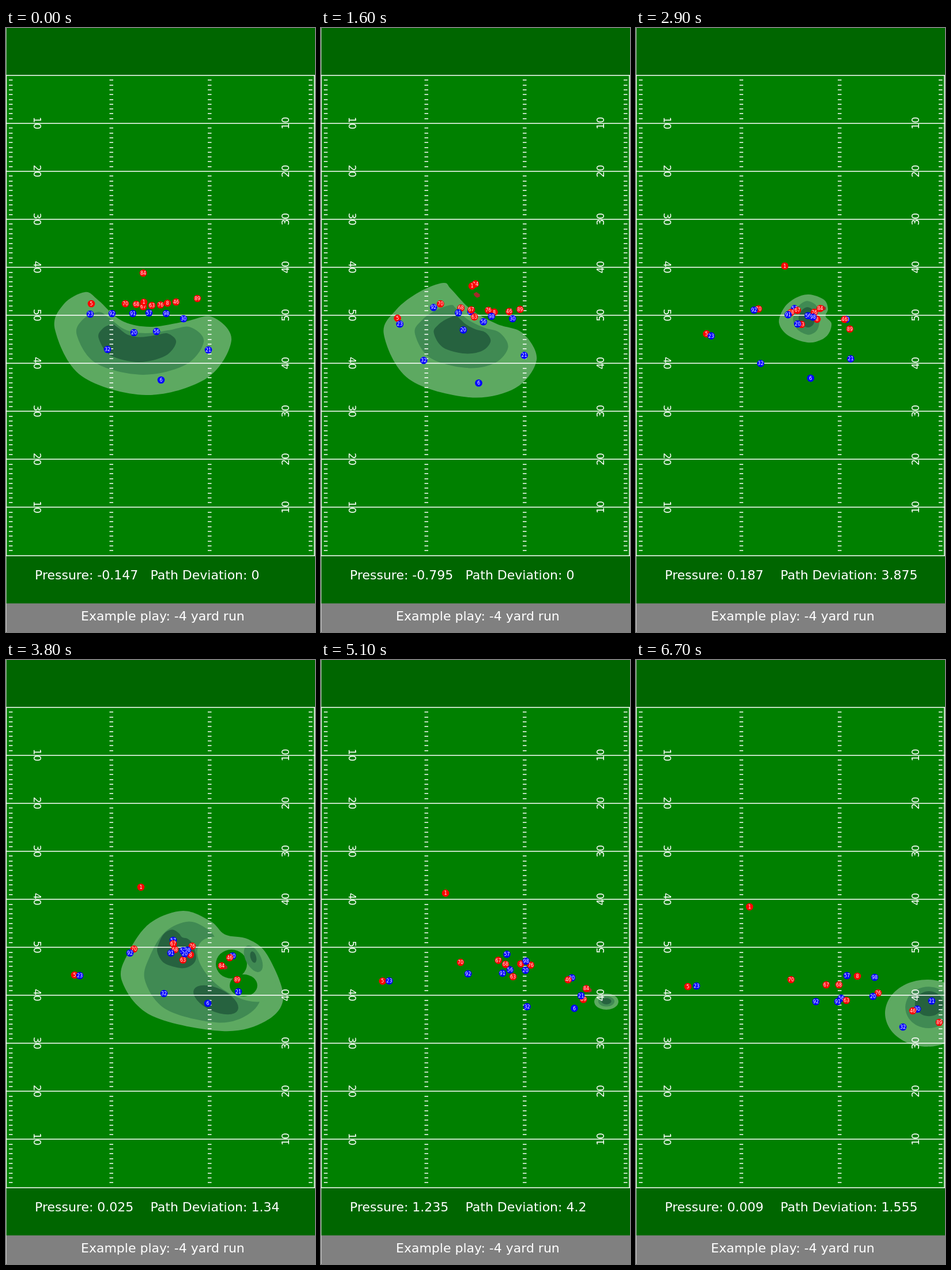
These frames come from a looping animation (536x1045 px, 6.8 s). An HTML page:

```html
<!DOCTYPE html>
<html lang="en">
<head>
<meta charset="utf-8">
<title>Example play</title>
<style>
  html, body { margin: 0; width: 100%; height: 100%; overflow: hidden; background: #006600; }
  svg { display: block; width: 536px; height: 1045px; font-family: "DejaVu Sans", sans-serif; fill: #fff; }
  .line { stroke: #fff; stroke-width: 1.5; fill: none; }
  .yard { font-size: 17px; text-anchor: middle; }
  .info { font-size: 22px; white-space: pre; }
  .player { font-size: 8px; text-anchor: middle; }
</style>
</head>
<body>
<svg viewBox="0 0 536 1045">
  <rect width="536" height="1045" fill="#006600"/>
  <rect y="82" width="536" height="831" fill="#008000"/>
  <g id="heat"></g>
  <g id="field"></g>
  <g id="team"></g>
  <rect y="995.5" width="536" height="50" fill="#808080"/>
  <rect width="1" height="1045" opacity=".6"/>
  <text class="info" id="pressure" x="50" y="954"></text>
  <text class="info" id="deviation" x="250.5" y="954"></text>
  <text class="info" x="130" y="1025">Example play: -4 yard run</text>
</svg>
<script>
const STEP = 100, FRAMES = 68, TOP = 82, YARD = 8.305;
const LIGHT = '#5da961', MID = '#408a53', DARK = '#26623f', GRASS = '#008000';
const $ = id => document.getElementById(id);

function add(parent, tag, attrs, text) {
  const el = document.createElementNS('http://www.w3.org/2000/svg', tag);
  for (const k in attrs) el.setAttribute(k, attrs[k]);
  if (text !== undefined) el.textContent = text;
  parent.appendChild(el);
  return el;
}

function drawField() {
  let d = 'M.5 82V913M535 82V913';
  for (let yard = 0; yard <= 100; yard++) {
    const y = Math.round(TOP + yard * YARD);
    if (yard % 10 === 0) d += `M0 ${y}H536`;
    else for (const x of [5, 179.5, 350, 525]) d += `M${x} ${y}h6.5`;
  }
  add($('field'), 'path', { d, class: 'line' });
  for (let yard = 10; yard < 100; yard += 10) {
    const y = TOP + yard * YARD - 0.5;
    for (const [x, turn] of [[54, 90], [485, -90]])
      add($('field'), 'text', { class: 'yard', y: 6.2, transform: `translate(${x} ${y}) rotate(${turn})` },
        Math.min(yard, 100 - yard));
  }
}

// Interpolation between keys at the given times
const mix = (a, b, u) => a + (b - a) * u;
function locate(times, f) {
  let i = 0;
  while (i < times.length - 2 && f >= times[i + 1]) i++;
  return [i, (f - times[i]) / (times[i + 1] - times[i])];
}
function linear(times, values, f) {
  const [i, u] = locate(times, f);
  return mix(values[i], values[i + 1], u);
}
function spline(times, v, f) {
  const [i, u] = locate(times, f), h = times[i + 1] - times[i], w = 1 - u;
  const slope = k => {
    const a = Math.max(k - 1, 0), b = Math.min(k + 1, v.length - 1);
    return k ? (v[b] - v[a]) / (times[b] - times[a]) : 0;
  };
  return v[i] * (1 + 2 * u) * w * w + v[i + 1] * u * u * (3 - 2 * u)
       + h * u * w * (slope(i) * w - slope(i + 1) * u);
}

// Closed smooth outline through a flat list of points
function outline(p) {
  const n = p.length / 2, at = (i, c) => p[((i + n) % n) * 2 + c];
  let d = `M${p[0]} ${p[1]}`;
  for (let i = 0; i < n; i++) {
    const c = [];
    for (const k of [0, 1]) {
      c[k] = at(i, k) + (at(i + 1, k) - at(i - 1, k)) / 6;
      c[k + 2] = at(i + 1, k) - (at(i + 2, k) - at(i, k)) / 6;
      c[k + 4] = at(i + 1, k);
    }
    d += 'C' + c.map(v => v.toFixed(1)).join(' ');
  }
  return d + 'Z';
}
function oval(cx, cy, rx, ry) {
  const p = [];
  for (let i = 0; i < 12; i++) {
    const a = Math.PI * (1 + i / 6);
    p.push(cx + rx * Math.cos(a), cy + ry * Math.sin(a));
  }
  return p;
}

// Heat map: the inner bands are the outer edge shrunk towards a focus
const heat = [];
const shrink = (edge, [fx, fy, sx, sy]) =>
  edge.map((v, i) => i % 2 ? mix(fy, v, sy) : mix(fx, v, sx));
function heatKey(time, edge, mid, core = [mid[0], mid[1], mid[2] * 0.61, mid[3] * 0.6]) {
  heat.push({ time, bands: [edge, shrink(edge, mid), shrink(edge, core)] });
}
heatKey(0, [85,522, 100,478, 137,457, 160,471, 200,506, 250,517, 310,508, 358,500, 391,540, 348,606, 243,635, 131,602],
  [220, 545, 0.72, 0.61]);
heatKey(16, [109,530, 130,488, 170,457, 212,441, 226,452, 260,487, 305,512, 350,528, 374,574, 337,623, 257,639, 152,607],
  [247, 526, 0.61, 0.55]);
heatKey(23, [126,551, 144,512, 220,467, 318,440, 358,464, 322,498, 345,523, 360,553, 411,602, 375,644, 295,657, 165,621],
  [274, 466, 0.46, 0.47]);
heatKey(29, [248,510, 257,484, 277,467, 300,461, 326,470, 333,486, 329,499, 339,511, 334,529, 320,540, 297,544, 264,532],
  [297, 499, 0.5, 0.7]);
heatKey(38, [201,555, 213,505, 250,455, 307,434, 355,452, 380,475, 420,483, 453,510, 481,583, 450,625, 375,642, 252,615],
  [344, 550, 0.72, 0.84], [282, 482, 0.24, 0.32]);
heatKey(51, oval(495, 591, 21, 14), [495, 590, 0.67, 0.64]);
heatKey(67, oval(505, 611, 73, 58), [510, 585, 0.55, 0.62]);
const heatTimes = heat.map(k => k.time);
const bands = [LIGHT, MID, DARK].map(fill => add($('heat'), 'path', { fill }));

// Gaps and islands that open and close around one moment
const islands = [];
function island(fill, cx, cy, rx, ry, turn) {
  islands.push({ cx, cy, turn, el: add($('heat'), 'ellipse', { fill, rx, ry }) });
}
island(LIGHT, 400, 535, 78, 42, 35);
island(GRASS, 391, 526, 27, 25, 0);
island(GRASS, 412, 563, 24, 19, 0);
island(MID, 429, 517, 13, 25, -28);
island(DARK, 429, 514, 5, 10, -15);
island(DARK, 364, 588, 42, 20, 25);

// Ball and players, bottom to top, each with four key points
const moveTimes = [0, 23, 38, 67], movers = [];
function mover(el, path) {
  movers.push({ el, x: path.filter((_, i) => i % 2 === 0), y: path.filter((_, i) => i % 2) });
}
function player(number, fill, path) {
  const g = add($('team'), 'g', { class: 'player' });
  add(g, 'circle', { r: 6.3, fill });
  add(g, 'text', { y: 2.9 }, number);
  mover(g, path);
}
const red = (n, ...path) => player(n, '#f00', path);
const blue = (n, ...path) => player(n, '#00f', path);

mover(add($('team'), 'path', { d: 'M-6 -2L-1 -5L5 -1L5 3L0 5L-4 2Z', fill: '#a52a2a' }),
  [238,481, 296,462, 379,531, 573,614]);
blue(57, 248,493, 268,489, 290,485, 366,546);
blue(30, 308,503, 349,504, 393,512, 488,604);
blue(56, 261,525, 293,501, 307,503, 356,585);
red(8, 280,476, 311,500, 320,510, 384,547);
red(70, 207,477, 209,480, 222,500, 269,553);
red(63, 253,480, 276,510, 307,519, 365,589);
red(67, 238,482, 273,490, 290,491, 330,562);
red(68, 226,478, 255,489, 293,501, 352,562);
red(46, 295,474, 346,500, 388,515, 480,607);
red(89, 332,468, 357,502, 401,553, 526,627);
red(76, 268,479, 303,493, 323,495, 420,576);
red(84, 238,424, 292,460, 374,529, 570,612);
red(1, 239,474.5, 268,429, 234,393, 197,427);
red(5, 148,477, 125,517, 119,545, 90,565);
blue(23, 146,495, 132,523, 128,546, 105,564);
blue(92, 184,494, 202,482, 215,507, 312,591);
blue(91, 220,494, 251,494, 286,507, 350,591);
blue(98, 278,494, 305,501, 315,502, 414,549);
blue(20, 222,527, 264,519, 310,508, 411,582);
blue(32, 176,556, 190,583, 274,577, 463,635);
blue(21, 351,557, 359,571, 403,574, 513,590);
blue(6, 269,609, 284,614, 350,594, 558,620);

const pressure = [-0.147, -0.795, 0.168, 0.187, 0.025, 1.235, 0.009];
const deviation = [0, 0, 0.689, 3.875, 1.34, 4.2, 1.555];
const reading = (values, f) => +linear(heatTimes, values, f).toFixed(3);

function draw(f) {
  const [i, u] = locate(heatTimes, f);
  bands.forEach((el, b) => {
    const next = heat[i + 1].bands[b];
    el.setAttribute('d', outline(heat[i].bands[b].map((v, k) => mix(v, next[k], u))));
  });
  const size = Math.max(0, 1 - Math.abs(f - 38) / 7);
  for (const { cx, cy, turn, el } of islands)
    el.setAttribute('transform', `translate(${cx} ${cy}) rotate(${turn}) scale(${size})`);
  for (const { el, x, y } of movers)
    el.setAttribute('transform',
      `translate(${spline(moveTimes, x, f).toFixed(2)} ${spline(moveTimes, y, f).toFixed(2)})`);
  $('pressure').textContent = 'Pressure: ' + reading(pressure, f);
  $('deviation').textContent = 'Path Deviation: ' + reading(deviation, f);
}

drawField();
const start = performance.now();
let shown = -1;
function tick() {
  const f = Math.floor(Math.max(0, performance.now() - start) / STEP) % FRAMES;
  if (f !== shown) draw(shown = f);
  requestAnimationFrame(tick);
}
tick();
</script>
</body>
</html>
```
